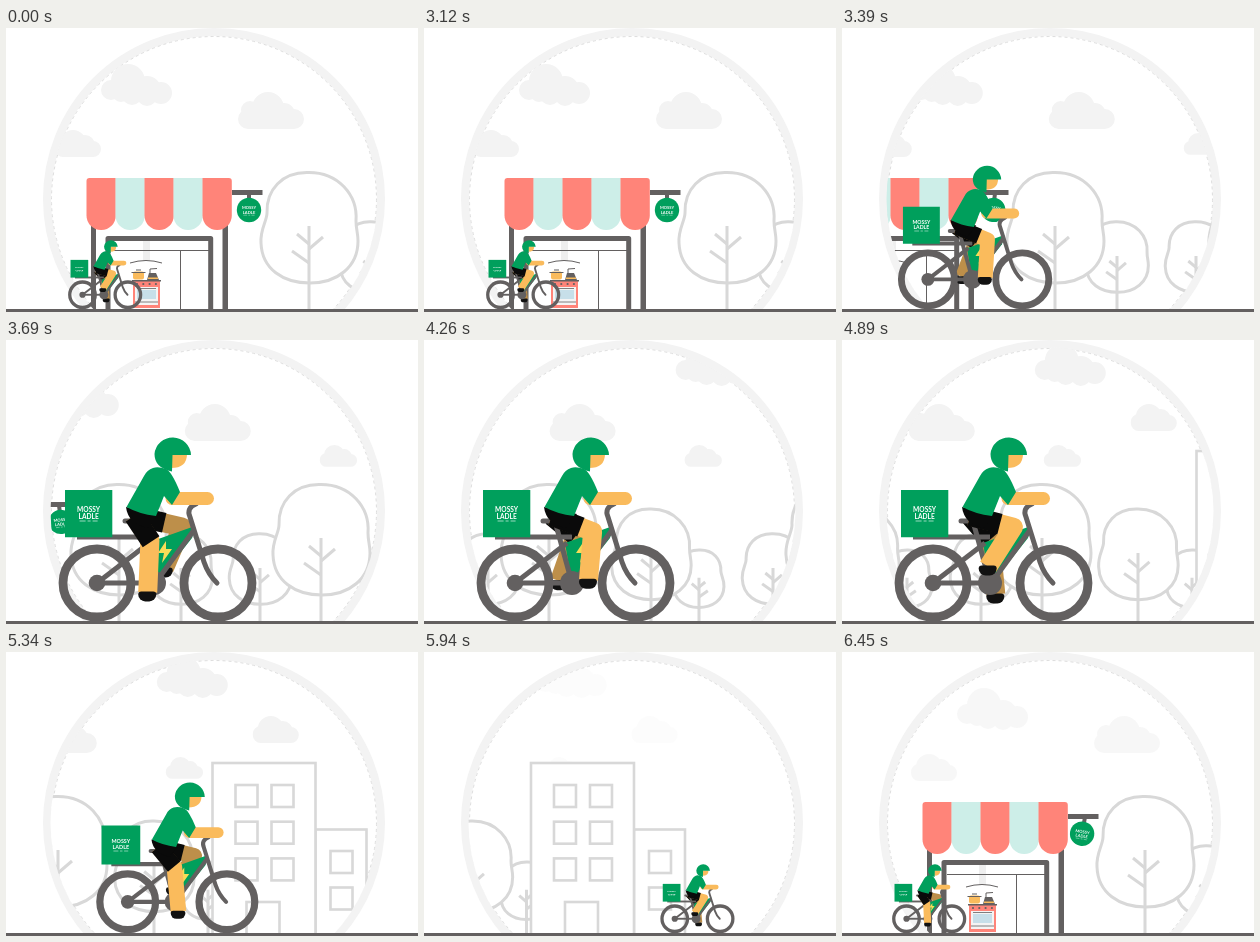
These frames come from a looping animation (412 px wide and 284 px high, 6480 ms). An HTML page with a canvas:

```html
<!DOCTYPE html>
<html lang="en">
<head>
<meta charset="utf-8">
<title>Bike delivery</title>
<style>
html, body { margin: 0; width: 100%; height: 100%; overflow: hidden; background: #fff; }
canvas { display: block; width: 412px; height: 284px; }
</style>
</head>
<body>
<canvas id="stage"></canvas>
<script>
const W = 412, H = 284, LOOP = 6480, STEP = 30;
const START = 3120, SLOW = 5280, STOP = 5580, LEAVE = 5760, ARRIVE = 6450;
const GROUND = 281, LAP = 1160;
const GRAY = '#636060', GREEN = '#009f5c', CORAL = '#ff8479', MINT = '#cdeee8';
const SKIN = '#fabb5c', SHADE = '#bd8f4a', LINE = '#d8d8d8', PALE = '#f3f3f3';
const BLACK = '#0a0a0a';

const canvas = document.getElementById('stage');
const c = canvas.getContext('2d');
const dpr = window.devicePixelRatio || 1;
canvas.width = W * dpr;
canvas.height = H * dpr;

const clamp = v => Math.max(0, Math.min(1, v));
const part = (t, a, b) => clamp((t - a) / (b - a));
const smooth = (t, a, b) => { const p = part(t, a, b); return p * p * (3 - 2 * p); };
const mix = (a, b, p) => a + (b - a) * p;

function rect(x, y, w, h, color, r = 0) {
  c.fillStyle = color;
  c.beginPath();
  c.roundRect(x, y, w, h, r);
  c.fill();
}
function disc(x, y, r, color) {
  c.fillStyle = color;
  c.beginPath();
  c.arc(x, y, r, 0, 7);
  c.fill();
}
function line(points, width, color, cap = 'butt') {
  c.strokeStyle = color;
  c.lineWidth = width;
  c.lineCap = cap;
  c.lineJoin = 'round';
  c.beginPath();
  points.forEach(p => c.lineTo(p[0], p[1]));
  c.stroke();
}
function shape(path, color) {
  c.fillStyle = color;
  c.fill(new Path2D(path));
}
function at(x, y, s, draw, flip = 1) {
  c.save();
  c.translate(x, y);
  c.scale(s * flip, s);
  draw();
  c.restore();
}

function logo(x, y, s) {
  at(x, y, s, () => {
    c.fillStyle = '#fff';
    c.textAlign = 'center';
    c.font = '700 6.6px Lato, sans-serif';
    c.fillText('MOSSY', 0, -1);
    c.fillText('LADLE', 0, 6);
    line([[-9, 8.4], [-3, 8.4]], 0.6, '#fff');
    line([[-1, 8.4], [2, 8.4]], 0.6, '#fff');
    line([[4, 8.4], [9, 8.4]], 0.6, '#fff');
  });
}

// Clouds are drawn from their top left corner: [x, y, radius] puffs.
const PUFFS = {
  large: [[10, 26, 10], [27, 17, 17], [46, 26, 14], [60, 29, 11], [31, 31, 10], [46, 32, 10], [20, 29, 9]],
  wide: [[10, 27, 10], [12, 18, 9], [30, 16, 16], [46, 22, 11], [56, 27, 10]],
  small: [[8, 18, 8], [18, 13, 13], [30, 15, 10], [38, 19, 8]]
};
function cloud(kind, x, y, s = 1) {
  at(x, y, s, () => {
    c.beginPath();
    for (const [px, py, r] of PUFFS[kind]) {
      c.moveTo(px + r, py);
      c.arc(px, py, r, 0, 7);
    }
    if (kind === 'wide') c.roundRect(0, 17, 66, 20, 10);
    if (kind === 'small') c.roundRect(0, 11, 46, 16, 8);
    c.fillStyle = PALE;
    c.fill();
  });
}
function homeClouds(dx) {
  cloud('large', 95 + dx, 36);
  cloud('wide', 232 + dx, 64);
  cloud('small', 49 + dx, 102);
}
function sky(t) {
  const ride = Math.max(0, Math.min(t, STOP) - START) + Math.max(0, t - LEAVE);
  const dx = -ride * 2.8 / STEP;
  c.globalAlpha = 1 - part(t, LEAVE, 6000);
  homeClouds(dx);
  cloud('small', 367 + dx, 105, 0.81);
  cloud('large', 358 + dx, 4);
  cloud('small', 454 + dx, 64);
  if (t > 6150) {
    c.globalAlpha = 0.65 * part(t, 6150, ARRIVE);
    homeClouds(20 + (ARRIVE - t) * 2.8 / STEP);
  }
  c.globalAlpha = 1;
}

const CROWN = new Path2D('M-1-136.5C-27-137-43-119-42-96C-42-88-49-80-48-66' +
  'C-47-40-26-26 1-26C28-26 49-42 49-68C49-76 47-80 47-88C49-114 29-137-1-136.5Z');
function tree(x, s, flip = 1) {
  at(x, GROUND, s, () => {
    const w = 3 / s;
    c.fillStyle = '#fff';
    c.fill(CROWN);
    c.strokeStyle = LINE;
    c.lineWidth = w;
    c.stroke(CROWN);
    line([[0, 0], [0, -83]], w, LINE);
    line([[-12, -75], [0, -65]], w, LINE);
    line([[14, -72], [0, -60]], w, LINE);
    line([[-17, -58], [0, -46]], w, LINE);
  }, flip);
}

function outline(x, y, w, h) {
  c.fillStyle = '#fff';
  c.fillRect(x, y, w, h);
  c.strokeStyle = LINE;
  c.lineWidth = 2.6;
  c.strokeRect(x, y, w, h);
}
function houses(x) {
  outline(x + 103, 177.5, 51, 106);
  outline(x, 111, 103, 173);
  for (let row = 0; row < 3; row++) {
    outline(x + 23, 133 + row * 36.7, 22, 22);
    outline(x + 59, 133 + row * 36.7, 22, 22);
    if (row < 2) outline(x + 118, 199 + row * 36.5, 22, 22);
  }
  outline(x + 34, 250, 33, 34);
}

function kitchen() {
  rect(137, 212, 7, 21, '#efefef');
  line([[105, 222.5], [203, 222.5]], 1, GRAY);
  line([[174.5, 222], [174.5, 281]], 1, GRAY);
  c.beginPath();
  c.moveTo(124, 235);
  c.quadraticCurveTo(140, 230, 156, 235);
  c.stroke();
  rect(127, 253, 27, 27, CORAL);
  rect(126, 252, 29, 1.5, GRAY);
  for (let i = 0; i < 4; i++) disc(131 + i * 6.3, 256, 1.1, GRAY);
  rect(129, 259, 23, 18, '#f4f4f4');
  rect(131, 262, 19, 9, '#c7dfe9');
  line([[131, 260.5], [150, 260.5]], 0.8, GRAY);
  line([[129, 274], [152, 274]], 0.8, GRAY);
  rect(127, 243.5, 11, 8, SKIN, 2);
  line([[125.5, 244.5], [139.5, 244.5]], 1, GRAY);
  line([[130, 242], [135, 242]], 1.2, GRAY);
  shape('M143 245L150 245L153 252L141 252Z', GRAY);
  line([[144, 245], [144, 241], [151, 240.5]], 1, GRAY);
  rect(142, 249.5, 10, 1.5, SKIN);
}
function shop(x, swing) {
  c.save();
  c.translate(x, 0);
  rect(87, 190, 133, 91, '#fff');
  kitchen();
  rect(85, 195, 5, 86, GRAY);
  rect(216.5, 195, 5.5, 86, GRAY);
  line([[102, 281], [102, 210.5], [204.7, 210.5], [204.7, 281]], 5, GRAY);
  for (let i = 0; i < 5; i++) {
    rect(80.5 + i * 29, 150, 29.3, 52, i % 2 ? MINT : CORAL, [i ? 0 : 3, i < 4 ? 0 : 3, 14.5, 14.5]);
  }
  rect(226, 162, 30.5, 5, GRAY);
  c.translate(243, 165);
  c.rotate(swing);
  rect(-2, 0, 4, 8, GRAY);
  disc(0, 17, 12.2, GREEN);
  logo(0, 17, 0.62);
  c.restore();
}

function travel(t) {
  if (t < START) return 0;
  if (t < SLOW) return (t - START) / 3;
  const p = part(t, SLOW, STOP);
  return 720 + 50 * p * (2 - p) + (LAP - 770) * smooth(t, LEAVE, ARRIVE - 10);
}
function world(t) {
  const x = -travel(t);
  for (const wx of [365, 444, 729, 365 + LAP]) tree(wx + x, 0.64);
  for (const wx of [655, 940]) tree(wx + x, 0.52, -1);
  for (const wx of [607, 886]) tree(wx + x, 0.82);
  for (const wx of [303, 505, 790, 303 + LAP]) tree(wx + x, 1);
  houses(944.5 + x);
  const out = t < START ? 0 : 0.12 * Math.sin((t - START) / 130);
  const back = 0.17 * Math.cos((ARRIVE - t) / 150);
  shop(x, out);
  shop(x + LAP, back);
}

// The knee follows a small ellipse in time with the pedal.
function leg(angle, skin) {
  const cos = Math.cos(angle), sin = Math.sin(angle);
  const hip = [128, 176];
  const knee = [160 + 8 * cos - 14 * sin, 193.5 - 1.5 * cos + 7 * sin];
  const foot = [150 + 14.5 * cos, 240.5 + 14.5 * sin];
  const turn = Math.atan2(knee[1] - hip[1], knee[0] - hip[0]);
  line([hip, knee, foot], 19, skin);
  rect(foot[0] - 9.5, foot[1] - 1, 18, 10, '#111', [3, 3, 7, 7]);
  line([hip, [hip[0] + 31 * Math.cos(turn), hip[1] + 31 * Math.sin(turn)]], 20, BLACK);
}
function wheel(x) {
  c.strokeStyle = GRAY;
  c.lineWidth = 8.8;
  c.beginPath();
  c.arc(x, 243, 34, 0, 7);
  c.stroke();
}
function rider(angle) {
  leg(angle + Math.PI, SHADE);
  wheel(91);
  wheel(212);
  shape('M141 203L189 186L186 198L154 238L147 238Z', GREEN);
  shape('M160 201L152 213L158 213L156 223L166 209L160 209Z', '#f6dc58');
  line([[91, 243], [148, 243]], 5, GRAY);
  line([[91, 243], [143, 203]], 5, GRAY);
  line([[132, 185], [148, 243]], 5, GRAY);
  line([[188, 190], [150, 242]], 5, GRAY);
  line([[71, 197], [148, 197]], 5, GRAY);
  line([[119, 181], [138, 181]], 5, GRAY, 'round');
  c.lineWidth = 5;
  c.beginPath();
  c.moveTo(190, 164);
  c.quadraticCurveTo(180, 168, 184, 177);
  c.lineTo(198, 222);
  c.quadraticCurveTo(202, 234, 211, 243);
  c.stroke();
  disc(91, 243, 8.3, GRAY);
  disc(148, 243, 12, GRAY);
  rect(59, 150, 47.3, 47.3, GREEN);
  logo(82.6, 172.6, 1);

  leg(angle, SKIN);
  shape('M120 167L153 174L142 188Q122 184 120 167Z', BLACK);
  line([[166, 158.5], [201.5, 158.5]], 13, SKIN, 'round');
  shape('M147 128Q152 126 160 129Q166 132 174 152L166 165L158 156L150 176Q133 174 120.5 167L138 136Q141 130 147 128Z', GREEN);
  shape('M165 114H181Q181 128 165 128Z', SKIN);
  shape('M185 115H166.5L166 131.5Q148.5 128 148.5 114A18.3 18.3 0 0 1 185 115Z', GREEN);
}

function bike(t) {
  const small = 0.375, step = (t - START) / STEP, deg = Math.PI / 180;
  let x = 99, s = small, alpha = 1, angle = 252;
  if (t >= START && t < LEAVE) {
    const grow = smooth(t, START, 3570), shrink = smooth(t, 5208, STOP);
    s = mix(small, 1, grow - shrink);
    x = mix(99, 151, grow) + 69 * shrink;
    angle = 252 + 12.25 * Math.min(step, (STOP - START) / STEP);
  } else if (t >= LEAVE && t < 6120) {
    const p = part(t, LEAVE, 6120);
    x = 220 + 142 * p * (0.5 + 0.5 * p);
    alpha = 1 - part(t, 6000, 6120);
    angle = 176 + 12.25 * (t - LEAVE) / STEP;
  } else if (t >= 6120) {
    const left = (t - ARRIVE) / STEP;
    x = 87 + 12.5 * left;
    angle = 100 + 12.25 * left;
  }
  c.globalAlpha = alpha;
  at(x, GROUND, s, () => {
    c.translate(-151, -GROUND);
    rider(angle * deg);
  });
  c.globalAlpha = 1;
}

function ring() {
  c.strokeStyle = PALE;
  c.lineWidth = 8;
  c.beginPath();
  c.arc(208, 171, 167, 0, 7);
  c.stroke();
  c.strokeStyle = '#dedede';
  c.lineWidth = 1;
  c.setLineDash([3, 3]);
  c.beginPath();
  c.arc(208, 171, 162.5, 0, 7);
  c.stroke();
  c.setLineDash([]);
}

function draw(t) {
  c.setTransform(dpr, 0, 0, dpr, 0, 0);
  c.fillStyle = '#fff';
  c.fillRect(0, 0, W, H);
  ring();
  c.save();
  c.beginPath();
  c.arc(208, 171, 163.5, 0, 7);
  c.clip();
  sky(t);
  world(t);
  c.restore();
  rect(0, GROUND, W, H - GROUND, '#fff');
  bike(t);
  rect(0, GROUND, W, H - GROUND, GRAY);
}

const begin = performance.now();
function tick() {
  const t = (performance.now() - begin) % LOOP;
  draw(Math.floor(t / STEP) * STEP);
  requestAnimationFrame(tick);
}
tick();
</script>
</body>
</html>
```
